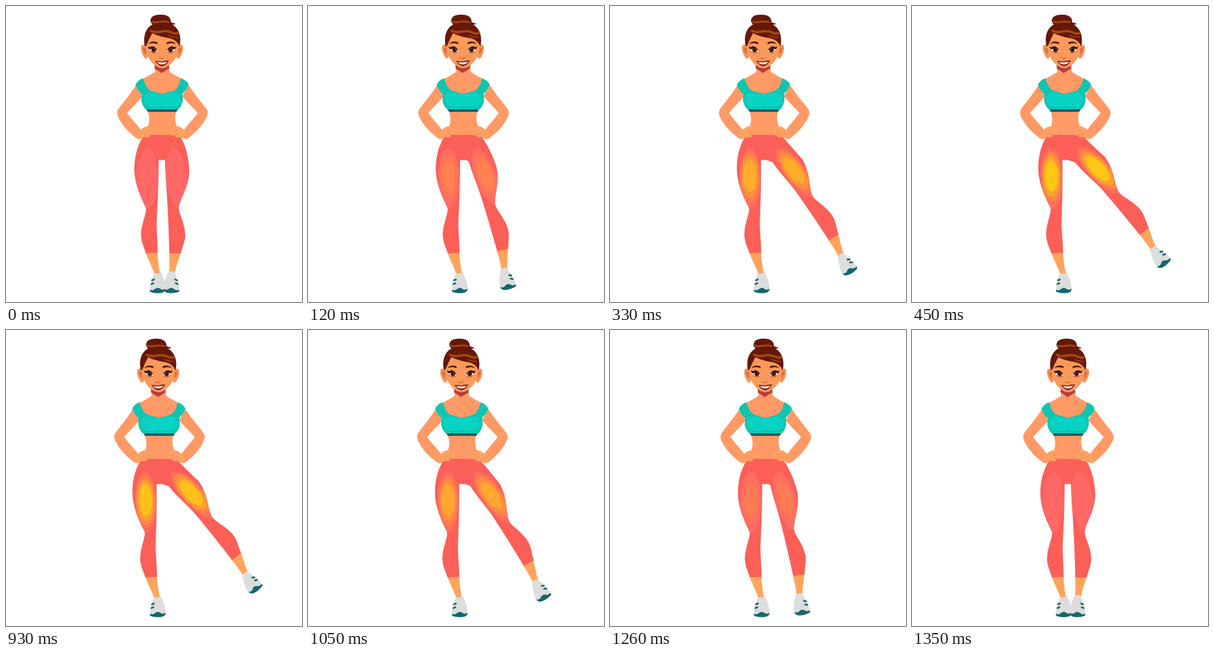
Animation of 512x512 px, one loop 1800 ms. Source, as an HTML page:

```html
<!DOCTYPE html>
<html lang="en">
<head>
<meta charset="utf-8">
<title>Side leg raise</title>
<style>
  html, body { margin: 0; width: 100%; height: 100%; overflow: hidden; background: #fff; }
  svg { display: block; width: 100%; height: 100%; }
  .skin { fill: #ff9966; }
  .calf { fill: #ffa45c; }
  .pants { fill: #fc5f58; }
  .hair { fill: #65180a; }
  .glow { fill: none; stroke: #a5480f; stroke-linecap: round; }
  .teal { fill: #12666f; }
</style>
</head>
<body>
<svg viewBox="0 0 512 512">
  <defs>
    <clipPath id="standClip"><use href="#stand"/></clipPath>
    <clipPath id="legClip"><use href="#leg"/></clipPath>
    <g id="shoe">
      <path fill="#dcdddd" d="M256,460 Q262,457 268,460 C271,468 276,477 276,488 Q276,493 272,494 L252,495 Q249,495 249,489 C249,479 254,471 256,460Z"/>
      <path class="teal" d="M249,491 Q254,493 257,490 Q263,485 268,490 Q272,492 276,489 Q276,494 270,496 Q261,498 251,495 Q248,494 249,491Z"/>
      <path fill="none" stroke="#12666f" stroke-width="3" d="M251.500,475 L257,472.500 M250.500,481.500 L256,479"/>
    </g>
    <g id="arm">
      <path class="skin" d="M225,137 C216,151 205,164 195,177 Q190,184 194,192 C202,209 214,219 226,229 L234,216 C227,205 217,196 209.500,185 C219,174 228,166 236,156Z"/>
    </g>
    <g id="hand">
      <path fill="#ffa163" d="M224,227 L233,214 Q240,207 247,208 L254,211 Q260,213 258,216 L252,216 Q257,219 253,221 L245,222 Q251,225 247,227 L238,227 Q234,231 228,230Z"/>
      <path fill="none" stroke="#ee8450" stroke-width=".8" d="M252,216 L243,215 M250,221 L240,219 M237,227 L241,223"/>
    </g>
    <g id="ear">
      <path fill="#f79457" d="M244,70 Q237,64 234,69 C232,76 237,88 241,91 Q245,91 246,86Z"/>
      <path fill="#d96f3c" d="M242,74 Q237,70 236.500,73 Q238,81 242,84Z"/>
    </g>
    <g id="eye">
      <path fill="#fff" d="M248,76 Q254,68 262,78 Q255,84 248,76Z"/>
      <circle cx="255.500" cy="76" r="4.300" fill="#702b10"/>
      <circle cx="255.500" cy="76" r="2.300" fill="#260b05"/>
      <circle cx="257" cy="74" r="1" fill="#fff"/>
      <path fill="#35100a" d="M245,69 Q247,72 249,71 Q256,67 262,77 Q255,71 249,75 Q246,74 245,69Z"/>
      <path fill="none" stroke="#8d3d1b" stroke-width=".9" d="M249,78 Q255,84 261,79"/>
      <path fill="#48170a" d="M246,66 Q252,59 262,63 L262,66 Q253,62.500 246,66Z"/>
    </g>
  </defs>

  <g id="body">
    <use href="#shoe"/>
    <path class="calf" d="M242,427 L262,427 C263,440 264,450 266,461 Q261,465 256,461 C252,449 246,440 242,427Z"/>
    <path id="stand" class="pants" d="M239,223 C230,236 222,256 222,282 C222,308 234,332 242,349 C244,358 234,375 233.500,396 C234,410 240,420 242,428 L262.500,427 C262,405 261,395 260.500,380 C261,360 262.500,340 263,320 Q264,290 264,266.500 L276,266.500 L300,224 Q270,221 239,223Z"/>
    <g clip-path="url(#standClip)"><g id="heatL" transform="translate(244.500 298)"></g></g>

    <g id="shin">
      <path class="calf" d="M282,427 L302,427 C299,440 294,449 292.500,461 Q287,465 282,461 C283,449 283,440 282,427Z"/>
      <use href="#shoe" transform="matrix(-1 0 0 1 548.5 0)"/>
    </g>
    <path id="leg" class="pants"/>
    <g clip-path="url(#legClip)"><g id="heatRight"><g id="heatR" transform="translate(295 298) rotate(-6)"></g></g></g>

    <path class="skin" d="M258,100 L282,100 L283,114 Q294,121 304,126 L306,165 L295,182 Q290,193 295,207 L301,224 Q270,222 239,223 L246,207 Q250,193 245,182 L234,165 L237,126 Q249,120 258,114Z"/>
    <use href="#arm"/>
    <use href="#arm" transform="matrix(-1 0 0 1 541 0)"/>
    <path fill="#10c5b0" d="M237,125 C241,137 245,145 252,147 L270,152 L289,147 C296,144 300,136 303,125 Q313,129 316,136 Q313,145 305,152 C307,162 305,175 296,180 L244,180 C235,175 233,162 235,153 Q227,145 224,136 Q228,128 237,125Z"/>
    <path fill="#08d3c4" d="M239,155 Q243,149 254,150 L270,153 L287,150 Q297,149 301,155 C305,167 299,174 286,174 Q276,175 270,172 Q263,176 252,174 C239,173 236,164 239,155Z"/>
    <path fill="#115866" d="M243,179 L297,179 L294.500,183 L245.500,183Z"/>
    <use href="#hand"/>
    <use href="#hand" transform="matrix(-1 0 0 1 541 0)"/>

    <path fill="#b93b3c" d="M257,102 L282,102 L282,108 Q275,112 269,116 Q264,112 257,108Z"/>
    <use href="#ear"/>
    <use href="#ear" transform="matrix(-1 0 0 1 540 0)"/>
    <path fill="#fa995c" d="M242,60 Q246,38 270,40 Q295,38 299,60 C300,78 296,92 283,102 Q270,113 257,102 C245,92 241,78 242,60Z"/>
    <path class="hair" d="M240,70 C235,44 248,28 270,28 C294,28 306,46 300,70 Q296,59 284,56 Q264,53 253,47 Q247,58 243,68Z"/>
    <path class="hair" d="M256,34 Q249,29 250,24 C252,16 260,15 269,15 C279,15 286,20 285,28 L294,31 Q289,33 282,33Z"/>
    <path class="glow" stroke-width="3" d="M253,27 C260,31 268,24 281,28"/>
    <path class="glow" stroke-width="4" d="M251,43 C262,49 273,40 284,45 Q291,49 297,47"/>
    <path class="glow" stroke-width="1.500" d="M281,51 Q291,55 297,54"/>
    <use href="#eye"/>
    <use href="#eye" transform="matrix(-1 0 0 1 540 0)"/>
    <path fill="#d26738" d="M263,88 Q269,92 275,88 Q272,92 269,92 Q266,92 263,88Z"/>
    <path fill="#8d241f" d="M258,95 Q264,95 269,96 Q275,94 282,94 Q278,103 270,104.500 Q262,103 258,95Z"/>
    <path fill="#fff" d="M261,97 Q270,98.500 279,96.500 Q275,101 270,101 Q264,101 261,97Z"/>
  </g>
</svg>
<script>
  const LOOP = 1800, TICK = 30, STEPS = 15, LOWER_AT = 930;
  const HIP = [283, 245], SWING = 36.9, SLIDE = [3, 4], LEAN = 0.0177;
  const REST = [255, 104, 102];
  // rx, ry, vertical offset and warm colour, from outside to inside
  const RINGS = [
    [18.5, 52, 0, [254, 112, 90]],
    [16.5, 43, -2, [255, 134, 68]],
    [14.5, 36, -3, [255, 160, 46]],
    [11.5, 27, -4, [255, 198, 22]]
  ];
  // x,y with an optional share of the hip movement
  const LEG = "M300,224,0 C309,236,.2 316,258,.7 317,285 C317,312 301,332 299,348 " +
    "C298,358 310,376 310,396 C310,408 304,418 302.5,428 L282.5,428 " +
    "C282,405 281.5,395 281,380 C280,355 279,340 278,322 " +
    "C277,303,.95 275,282,.8 275,266.5,.6 L274,266.5,0Z";

  const $ = id => document.getElementById(id);
  const set = (id, name, value) => $(id).setAttribute(name, value);
  const mix = (a, b, p) => a + (b - a) * p;

  function makeRings(id) {
    return RINGS.map(([rx, ry, cy]) => {
      const ring = document.createElementNS("http://www.w3.org/2000/svg", "ellipse");
      ring.setAttribute("rx", rx);
      ring.setAttribute("ry", ry);
      ring.setAttribute("cy", cy);
      $(id).append(ring);
      return ring;
    });
  }
  const heat = [makeRings("heatL"), makeRings("heatR")];

  function swing(x, y, lift) {
    const a = -SWING * lift * Math.PI / 180, dx = x - HIP[0], dy = y - HIP[1];
    return [
      HIP[0] + SLIDE[0] * lift + dx * Math.cos(a) - dy * Math.sin(a),
      HIP[1] + SLIDE[1] * lift + dx * Math.sin(a) + dy * Math.cos(a)
    ].map(v => v.toFixed(2)).join();
  }

  const legPath = lift => LEG.replace(/([\d.]+),([\d.]+)(?:,([\d.]+))?/g,
    (_, x, y, share = 1) => swing(+x, +y, lift * share));

  function progress(time) {
    const t = time % LOOP;
    const step = t < LOWER_AT
      ? Math.min(STEPS, Math.floor(t / TICK))
      : Math.max(0, STEPS - 1 - Math.floor((t - LOWER_AT) / TICK));
    return step / STEPS;
  }

  function pose(p) {
    const lift = p * (1 + 0.56 * (1 - p)), lean = LEAN * p;
    const hipMove = `translate(${SLIDE.map(v => v * lift)}) rotate(${-SWING * lift} ${HIP})`;
    set("body", "transform", `matrix(1 0 ${lean} 1 ${-485 * lean} 0)`);
    set("shin", "transform", hipMove);
    set("heatRight", "transform", hipMove);
    set("leg", "d", legPath(lift));
    for (const rings of heat) {
      rings.forEach((ring, i) => {
        const rgb = RINGS[i][3].map((c, k) => Math.round(mix(REST[k], c, p)));
        ring.setAttribute("fill", `rgb(${rgb})`);
      });
    }
  }

  const start = performance.now();
  function frame() {
    pose(progress(performance.now() - start));
    requestAnimationFrame(frame);
  }
  frame();
</script>
</body>
</html>
```
